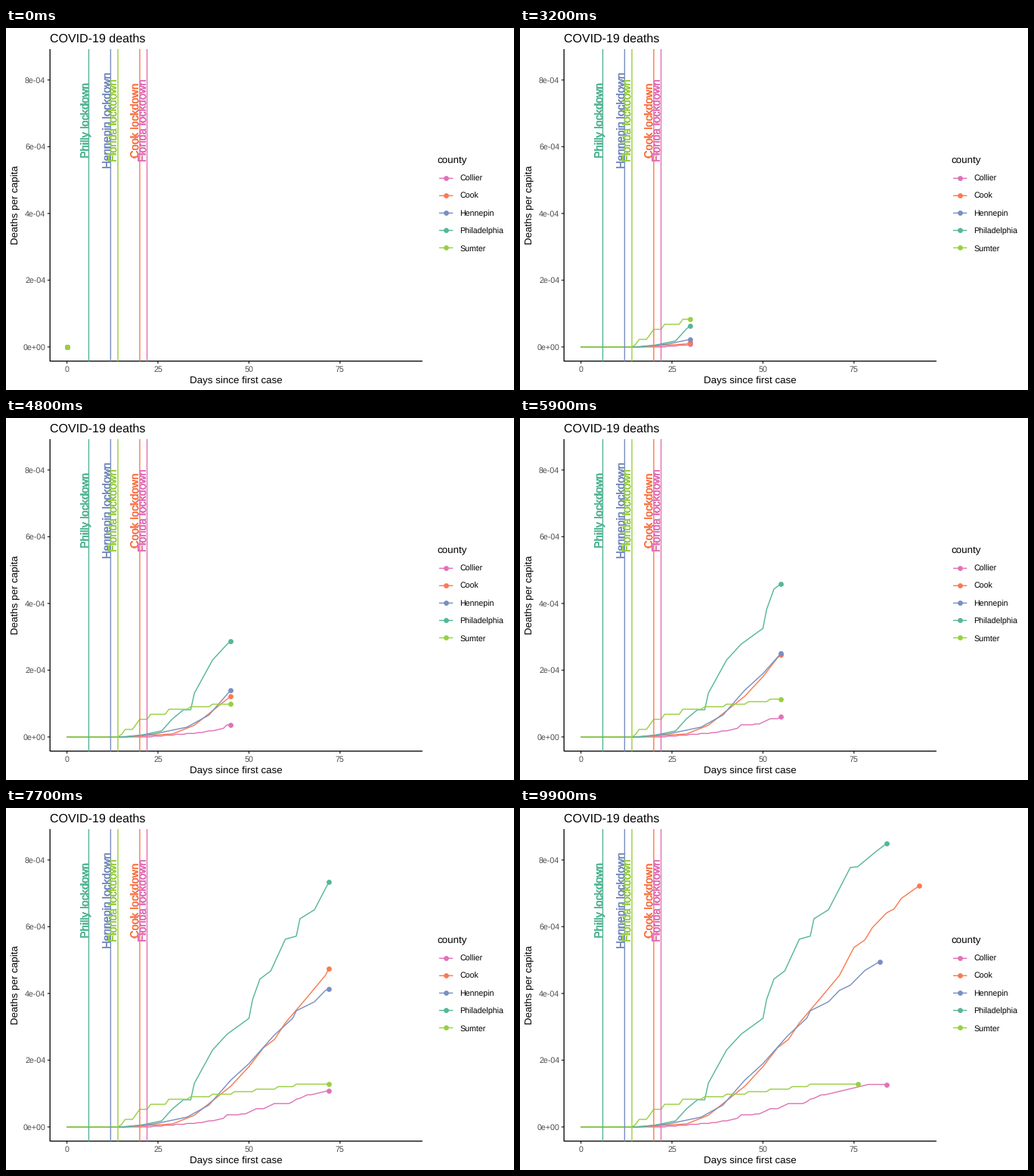
Animation, 672 px wide and 480 px high, one loop 10 s. Source, as a matplotlib script:

```python
import numpy as np
import matplotlib.pyplot as plt
from matplotlib.animation import FuncAnimation

W, H, DPI = 672, 480, 96
FRAMES, LAST_DAY = 100, 93
LINE = 1.42
LEFT, RIGHT, TOP, BOTTOM = 58.2, 550.9, 28, 441.7

plt.rcParams.update({
    "font.family": "Liberation Sans",
    "text.hinting": "none",
    "path.snap": False,
})

PINK, ORANGE, BLUE = "#e172b7", "#fa7a4f", "#798fc1"
TEAL, LIME = "#55b795", "#98d041"


def pt(px):
    return px * 72 / DPI


def day_x(day):
    return 80.6 + 4.816 * np.asarray(day)


def rise_y(rise):
    return 422.9 - np.asarray(rise)


def trend(*knots):
    """Daily values along straight pieces between (day, value) knots."""
    days, values = zip(*knots)
    return np.interp(np.arange(days[-1] + 1), days, values)


# Heights above the zero line, in pixels. The two small counties climb
# in whole deaths, so their curves are stairs.
collier = 1.15 * np.floor(trend(
    (21, 0), (30, 3), (36, 5), (43, 10), (44, 14), (49, 15.5), (52, 21),
    (54, 21), (57, 27), (61, 27), (63, 32), (66, 37), (79, 49), (84, 49)))
sumter = 3.34 * np.floor(trend(
    (14, 0), (16, 3), (18, 3), (20, 7), (22, 7), (23, 9), (27, 9),
    (28, 11), (63, 17), (76, 17)))
cook = trend(
    (16, 0), (29, 4), (35, 15.5), (45, 54), (50, 80), (54, 105), (57, 116),
    (60, 138), (66, 172), (71, 201), (75, 238), (78, 248), (80, 264),
    (84, 284), (86, 289), (88, 303), (93, 320))
hennepin = trend(
    (15, 0), (24, 4), (33, 13), (39, 29), (45, 62), (50, 84), (57, 122),
    (62, 144), (63, 154), (68, 166), (71, 181), (74, 188), (78, 207.5),
    (82, 219))
philadelphia = trend(
    (16, 0), (20, 2), (26, 8), (29, 24), (32, 36), (34, 36), (35, 58),
    (40, 102), (44, 123), (50, 144), (51, 169), (53, 196), (56, 207),
    (60, 249), (63, 253), (64, 276), (68, 288), (74, 344), (76, 345),
    (81, 365), (84, 376))

counties = [
    ("Collier", PINK, collier),
    ("Cook", ORANGE, cook),
    ("Hennepin", BLUE, hennepin),
    ("Philadelphia", TEAL, philadelphia),
    ("Sumter", LIME, sumter),
]

lockdowns = [
    (6, "Philly", TEAL),
    (12, "Hennepin", BLUE),
    (14, "Florida", LIME),
    (20, "Cook", ORANGE),
    (22, "Florida", PINK),
]

fig = plt.figure(figsize=(W / DPI, H / DPI), dpi=DPI, facecolor="white")
ax = fig.add_axes([0, 0, 1, 1])
ax.set(xlim=(0, W), ylim=(H, 0))
ax.axis("off")


def text(x, y, s, px, color="black", **kw):
    return ax.text(x, y, s, fontsize=pt(px), color=color, va="baseline", **kw)


def upright(x, y, s, px, color="black", **kw):
    return text(x, y, s, px, color, rotation=90, rotation_mode="anchor",
                ha="center", **kw)


def stroke(xs, ys, color, width=LINE, **kw):
    return ax.plot(xs, ys, color=color, lw=pt(width),
                   solid_capstyle="butt", **kw)[0]


def dot(x, y, color, **kw):
    return ax.plot([x], [y], "o", color=color, ms=pt(6.8), mew=0, **kw)[0]


def draw_axes():
    for day in range(0, 100, 25):
        x = day_x(day)
        stroke([x, x], [BOTTOM, BOTTOM + 3.4], "#333333", 1.29)
        text(x, 456, str(day), 10.67, "#4d4d4d", ha="center")
    for n in range(0, 10, 2):
        y = rise_y(44.25 * n)
        label = f"{n}e-04" if n else "0e+00"
        stroke([LEFT - 3.4, LEFT], [y, y], "#333333", 1.29)
        text(52.2, y + 3.8, label, 10.67, "#4d4d4d", ha="right")
    stroke([LEFT, LEFT, RIGHT], [TOP, BOTTOM, BOTTOM], "black", 1.29,
           solid_joinstyle="miter")
    text(LEFT, 19, "COVID-19 deaths", 16)
    text((LEFT + RIGHT) / 2, 471, "Days since first case", 13.33, ha="center")
    upright(16.4, (TOP + BOTTOM) / 2, "Deaths per capita", 13.33)


def draw_legend():
    text(570.6, 179, "county", 13.33)
    for i, (name, color, _) in enumerate(counties):
        y = 199.3 + 23.04 * i
        stroke([572.9, 591.3], [y, y], color)
        dot(582.2, y, color)
        text(600.3, y + 4, name, 10.67)


def draw_lockdowns():
    for day, _, color in lockdowns:
        x = day_x(day)
        stroke([x, x], [TOP, BOTTOM], color, zorder=5)
    # Stacked copies give the labels their heavy, hard edges
    for day, place, color in lockdowns:
        for _ in range(12):
            upright(day_x(day), 122, f"{place} lockdown", 14.67, color,
                    zorder=6)


draw_axes()
draw_legend()
draw_lockdowns()
curves = [stroke([], [], color, zorder=3) for _, color, _ in counties]
heads = [dot(0, 0, color, zorder=4) for _, color, _ in counties]


def update(frame):
    today = round(frame * LAST_DAY / (FRAMES - 1))
    for (_, _, rise), curve, head in zip(counties, curves, heads):
        ys = rise_y(rise[:today + 1])
        xs = day_x(np.arange(len(ys)))
        curve.set_data(xs, ys)
        head.set_data(xs[-1:], ys[-1:])
    return curves + heads


anim = FuncAnimation(fig, update, frames=FRAMES, interval=100,
                     init_func=lambda: update(0), repeat=True, repeat_delay=0)
plt.show()
```
